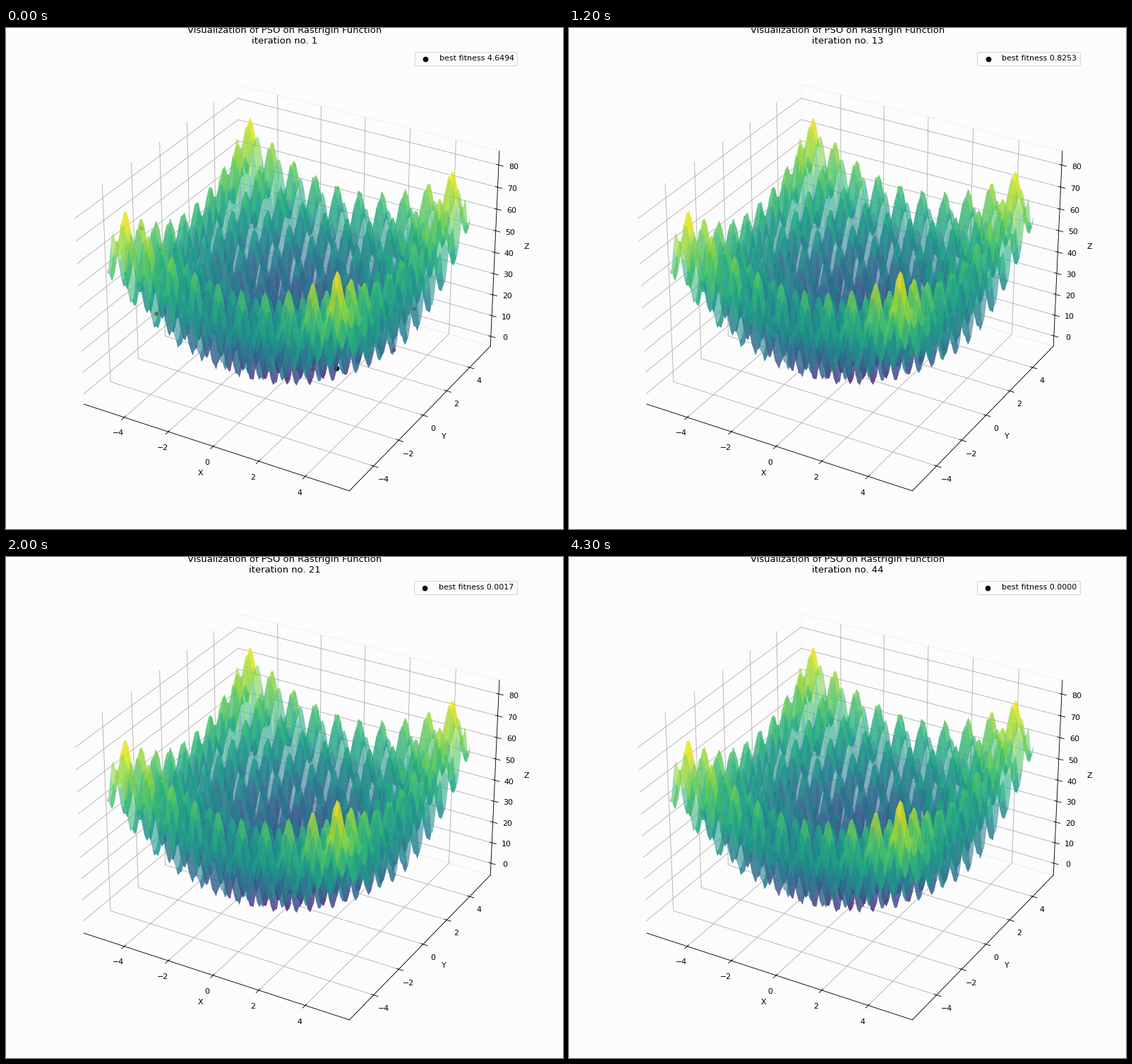
A matplotlib script that plays this animation: 789x710 px, repeating every 4400 ms.

```python
import numpy as np
import matplotlib.pyplot as plt
from matplotlib.animation import FuncAnimation
from matplotlib.collections import PolyCollection
from mpl_toolkits.mplot3d import proj3d

W, H, DPI = 789, 710, 78.9
FRAMES, INTERVAL = 44, 100
BACK = "#fcfcfc"
SIDE, BOTTOM = 669.6, 11.83
BOX = [(W - SIDE) / 2 / W, BOTTOM / H, SIDE / W, SIDE / H]
EDGE, SAMPLES = 5.12, 100

# first frame, best fitness, x and y of the best position
BEST = [
    (0, 4.6494, 2.0, 0.057),
    (3, 1.0987, 1.0, 0.022),
    (9, 0.8253, -0.0646, 0.0),
    (13, 0.1282, -0.0254, 0.0),
    (16, 0.0017, 0.003, 0.0),
    (26, 0.0009, 0.002, 0.0),
    (29, 0.0, 0.0, 0.0),
]


def rastrigin(x, y):
    return 20 + x**2 + y**2 - 10 * (np.cos(2 * np.pi * x) + np.cos(2 * np.pi * y))


line = np.linspace(-EDGE, EDGE, SAMPLES)
gx, gy = np.meshgrid(line, line)
gz = rastrigin(gx, gy)

# blocks of two by two cells, each drawn as one patch along its perimeter
stops = np.append(np.arange(0, SAMPLES - 1, 2), SAMPLES - 1)
lo, hi = stops[:-1], stops[1:]
mid = (lo + hi) // 2
RING = [(lo, lo), (lo, mid), (lo, hi), (mid, hi), (hi, hi), (hi, mid), (hi, lo), (mid, lo)]


def patches(a):
    return np.stack([a[np.ix_(r, c)].ravel() for r, c in RING], axis=-1)


mean_z = patches(gz).mean(axis=1)
level = (mean_z - mean_z.min()) / np.ptp(mean_z)
colors = plt.get_cmap("viridis")(level)
colors[:, 3] = 0.6

# swarm: four on the rim, the rest inside the bowl, one late straggler
rng = np.random.default_rng(4)
rim = np.array([[-3.07, -4.80], [-4.60, -3.36], [5.00, 0.71], [5.08, -1.07]])
inner = np.round(rng.uniform([-1.4, -0.4], [1.4, 2.4], (8, 2)))
starts = np.vstack([rim, inner])
phase = rng.uniform(0, 2 * np.pi, len(starts))
STRAY_T = [0, 7, 11, 13, 20, 24, 34, 43]
STRAY_X = [1, -1, -1.33, 0, -0.24, 0, 0, 0]
STRAY_Y = [2, 2, 3.14, 1, 2.33, 1, 0, 0]


def swarm(k):
    shrink = 0.74**k
    turn = 0.35 * np.sin(0.9 * k + phase) - 0.35 * np.sin(phase)
    c, s = np.cos(turn), np.sin(turn)
    x = shrink * (c * starts[:, 0] - s * starts[:, 1])
    y = shrink * (s * starts[:, 0] + c * starts[:, 1])
    x = np.append(x, np.interp(k, STRAY_T, STRAY_X))
    y = np.append(y, np.interp(k, STRAY_T, STRAY_Y))
    return np.clip(x, -EDGE, EDGE), np.clip(y, -EDGE, EDGE)


def padded(low, high):
    pad = (0.05 + 1.1 / 48) * (high - low)
    return low - pad, high + pad


# the small surplus keeps the pixel size from rounding down
fig = plt.figure(figsize=((W + 0.01) / DPI, (H + 0.01) / DPI), dpi=DPI, facecolor=BACK)
ax = fig.add_axes(BOX, projection="3d", facecolor=BACK)
ax.set_xlim(*padded(-EDGE, EDGE))
ax.set_ylim(*padded(-EDGE, EDGE))
ax.set_xlabel("X")
ax.set_ylabel("Y")
ax.set_zlabel("Z")
for axis in (ax.xaxis, ax.yaxis, ax.zaxis):
    axis.pane.fill = False

# flat layer over the 3D box: projected dots, then the surface on top
top = fig.add_axes(BOX)
top.set_axis_off()
top.set_autoscale_on(False)
dots = top.scatter([], [], s=20, color="red", transform=ax.transData, zorder=1)
best = top.scatter([0], [0], s=36, color="black", transform=ax.transData, zorder=2,
                   label="best fitness 0.0000")
surface = PolyCollection([], edgecolors="none", linewidths=0,
                         transform=ax.transData, zorder=3)
top.add_collection(surface, autolim=False)

title = ax.set_title("", y=1.0)
title.set_y(1.0)  # 3D axes lower their title by default
legend = ax.legend(handles=[best], loc="upper right", facecolor=BACK)
caption = legend.get_texts()[0]
shown = {"zlim": None}


def place_surface():
    flat = proj3d.proj_transform(gx.ravel(), gy.ravel(), gz.ravel(), ax.get_proj())
    px, py, pz = (patches(np.asarray(p).reshape(gx.shape)) for p in flat)
    order = np.argsort(-pz.mean(axis=1), kind="stable")
    surface.set_verts(np.stack([px, py], axis=-1)[order])
    surface.set_facecolor(colors[order])


def update(k):
    _, value, bx, by = [b for b in BEST if b[0] <= k][-1]
    zlim = padded(min(gz.min(), value), gz.max())
    if zlim != shown["zlim"]:
        shown["zlim"] = zlim
        ax.set_zlim(*zlim)
        place_surface()

    proj = ax.get_proj()
    x, y = swarm(k)
    px, py, pz = (np.asarray(p) for p in proj3d.proj_transform(x, y, rastrigin(x, y), proj))
    dots.set_offsets(np.column_stack([px, py]))
    shade = np.zeros((len(px), 4))
    shade[:, 0] = 1
    shade[:, 3] = 1 - 0.7 * (pz - pz.min()) / max(np.ptp(pz), 1e-9)
    dots.set_color(shade)

    qx, qy, _ = proj3d.proj_transform(np.array([bx]), np.array([by]), np.array([value]), proj)
    best.set_offsets(np.column_stack([qx, qy]))

    title.set_text(f"Visualization of PSO on Rastrigin Function\niteration no. {k + 1}")
    caption.set_text(f"best fitness {value:.4f}")
    return []


def reset():
    shown["zlim"] = None
    return update(0)


anim = FuncAnimation(fig, update, frames=FRAMES, init_func=reset, interval=INTERVAL,
                     repeat=True, repeat_delay=0, blit=False)
plt.show()
```
